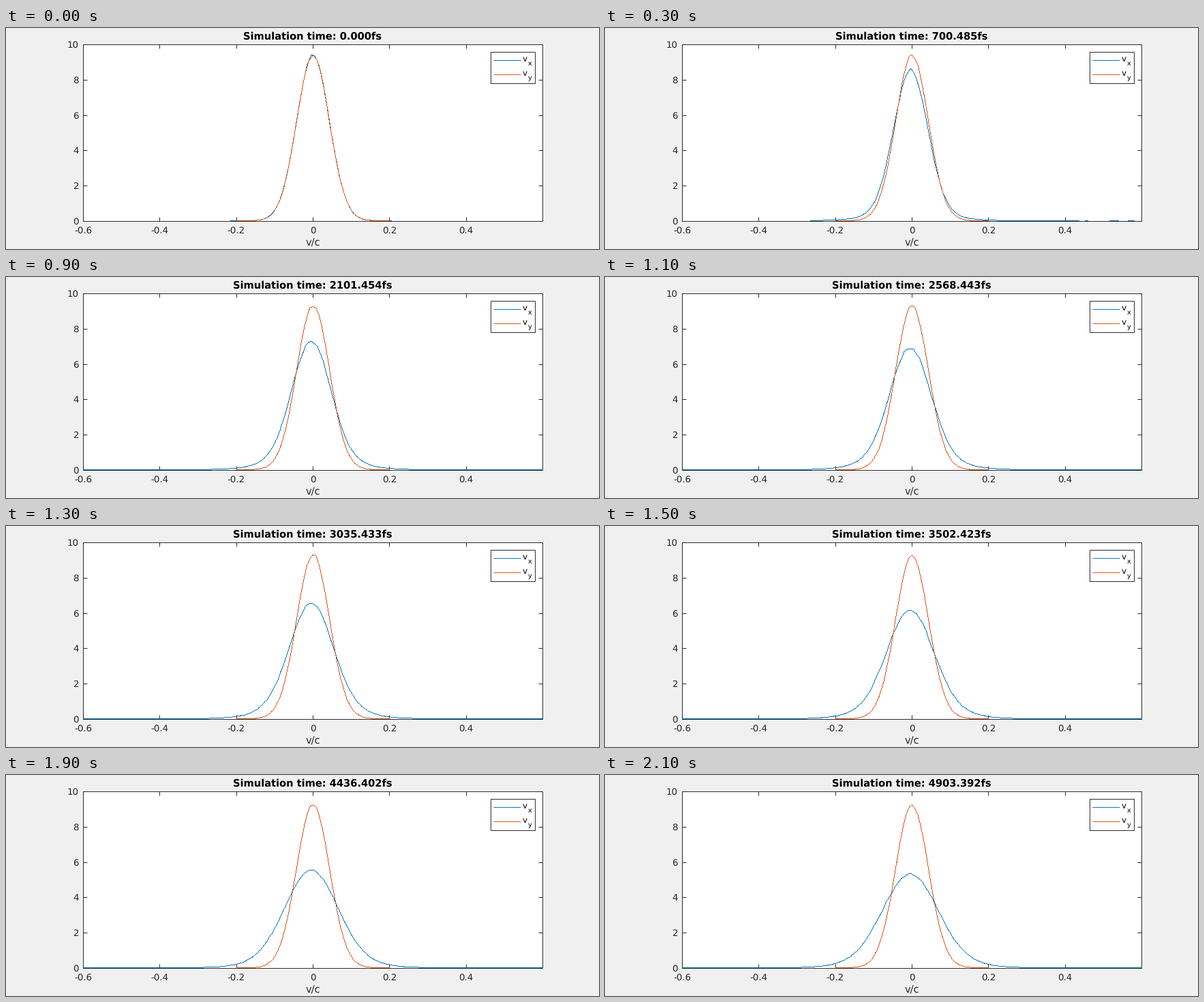
A matplotlib script for the animation above (2.2 s loop, 870x324 px).

```python
import numpy as np
import matplotlib.pyplot as plt
from matplotlib.animation import FuncAnimation
from matplotlib.patches import Rectangle

W, H, DPI = 870, 324, 96
FRAMES, INTERVAL = 22, 100
STEP_FS = 233.49486
LEFT, RIGHT, TOP, BOTTOM = 113, 787, 24, 283
DARK, BLUE, ORANGE = "#262626", "#0072BD", "#D95319"
BIN = 0.008
ROOT = np.sqrt(2 * np.pi)

# Extent of the populated velocity bins while the tails spread out
TAIL_LO = [-0.215, -0.24, -0.255, -0.265, -0.36, -0.5, -0.585]
TAIL_HI = [0.205, 0.35, 0.45, 0.58, 0.6, 0.6, 0.6]

plt.rcParams["font.family"] = "DejaVu Sans"
plt.rcParams["text.hinting"] = "none"
fig = plt.figure(figsize=(W / DPI, H / DPI), dpi=DPI, facecolor="#F0F0F0")
ax = fig.add_axes([0, 0, 1, 1])
ax.set_xlim(0, W)
ax.set_ylim(H, 0)
ax.axis("off")


def px(v):
    return LEFT + (np.asarray(v) + 0.6) / 1.2 * (RIGHT - LEFT)


def py(p):
    return BOTTOM - np.asarray(p) / 10 * (BOTTOM - TOP)


def box(x0, y0, x1, y1, z):
    ax.add_patch(Rectangle((x0, y0), x1 - x0, y1 - y0, fc="white", ec=DARK,
                           lw=0.72, zorder=z))


def stroke(xs, ys, color=DARK, z=2):
    ax.plot(xs, ys, color=color, lw=0.72, solid_capstyle="butt", zorder=z)


def label(x, y, s, size=10, color=DARK, ha="center", **kw):
    return ax.text(x, y, s, fontsize=size, color=color, ha=ha,
                   va="baseline", zorder=6, **kw)


def draw_axes():
    box(LEFT, TOP, RIGHT, BOTTOM, 1)
    tick = 6
    for v in (-0.6, -0.4, -0.2, 0, 0.2, 0.4):
        x = px(v)
        stroke([x, x], [BOTTOM, BOTTOM - tick])
        stroke([x, x], [TOP, TOP + tick])
        label(x, 301, f"{v:g}")
    for p in range(0, 11, 2):
        y = py(p)
        stroke([LEFT, LEFT + tick], [y, y])
        stroke([RIGHT, RIGHT - tick], [y, y])
        label(107, y + 5, str(p), ha="right")
    label(450, 320, "v/c", 11)


def draw_legend():
    box(711, 35, 776, 81, 4)
    for y, color, sub in ((47, BLUE, "x"), (68, ORANGE, "y")):
        stroke([715, 755], [y, y], color, 5)
        label(757.5, y + 2, "v", 9, "black", "left")
        label(765.5, y + 8, sub, 7.2, "black", "left")


def density(v, peak, weight=0.0, wide=0.09, center=0.0):
    """Gaussian core plus a weighted wide one, scaled to the given peak."""
    core = (1 - weight) / (peak * ROOT - weight / wide)
    u = v - center
    return ((1 - weight) / core * np.exp(-u**2 / (2 * core**2))
            + weight / wide * np.exp(-u**2 / (2 * wide**2))) / ROOT


def jitter(p, rng):
    return np.maximum(p + rng.normal(0, 0.04, p.size) * np.sqrt(p / 9), 0)


def curve_x(n, rng):
    k = min(n, len(TAIL_LO) - 1)
    lo = TAIL_LO[k] if n < len(TAIL_LO) else -0.6
    hi = TAIL_HI[k]
    v = np.arange(-75, 76) * BIN - BIN / 2
    v = np.concatenate([[lo], v[(v > lo) & (v < hi)], [hi]])
    peak = np.interp(n, [0, 3, 5, 9, 13, 17, 21],
                     [9.38, 8.55, 8.1, 7.27, 6.52, 5.75, 5.3])
    p = density(v, peak, 0.3 * np.sqrt(n / 21), 0.088 + 0.0005 * n,
                -0.0045 * min(n / 4, 1))
    p = jitter(p, rng)
    sparse = ((v < -0.34) & (n < 6)) | ((v > 0.42) & (n < 4))
    p[sparse & (rng.random(v.size) > 0.65)] = np.nan
    return v, p


def curve_y(n, rng):
    v = np.arange(-25, 26) * BIN
    return v, jitter(density(v, 9.38 - 0.008 * n), rng)


def pixels(v, p):
    """Walk a polyline in whole pixels, skipping its gaps."""
    pts = np.column_stack([px(v), py(p)])
    walk = [np.linspace(a, b, int(np.abs(b - a).max()) + 2)
            for a, b in zip(pts, pts[1:]) if not np.isnan(a + b).any()]
    return np.rint(np.concatenate(walk)).T


def pixel_line(color, z):
    return ax.plot([], [], ",", color=color, mew=0, zorder=z)[0]


draw_axes()
draw_legend()
title = label(450, 17, "", 11, "black", weight="bold")
line_x = pixel_line(BLUE, 3)
line_y = pixel_line(ORANGE, 3.1)


def update(n):
    rng = np.random.default_rng(40 + n)
    title.set_text(f"Simulation time: {n * STEP_FS:.3f}fs")
    line_x.set_data(*pixels(*curve_x(n, rng)))
    line_y.set_data(*pixels(*curve_y(n, rng)))
    return title, line_x, line_y


anim = FuncAnimation(fig, update, frames=FRAMES, interval=INTERVAL,
                     repeat=True, repeat_delay=0, blit=False)
plt.show()
```
